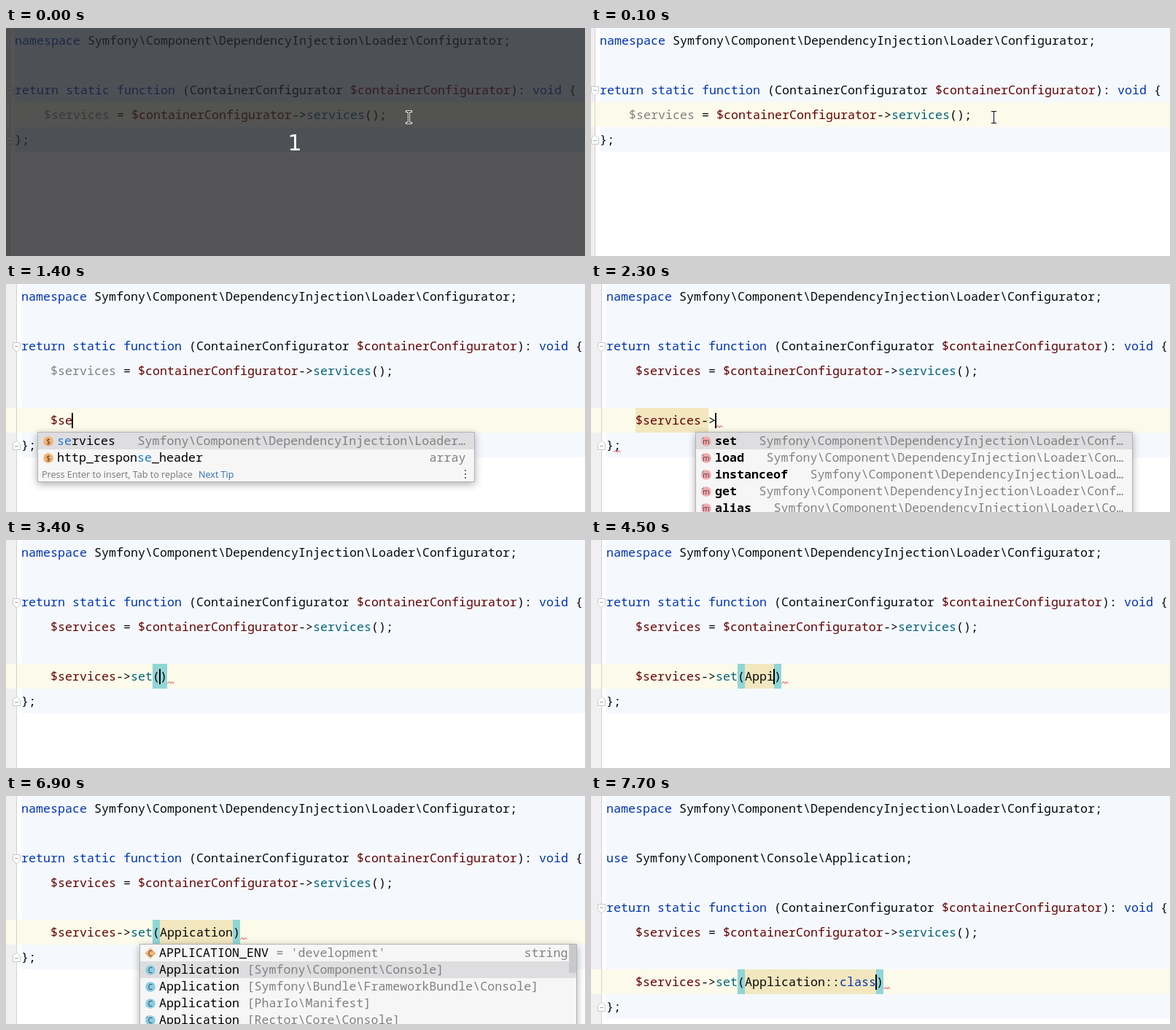
Write an HTML page with a canvas that moves like this. It is 794 px wide and 313 px high and loops after 8000 ms.

```html
<!DOCTYPE html>
<html lang="en">
<head>
<meta charset="utf-8">
<title>Code completion</title>
<style>
html, body { margin: 0; width: 100%; height: 100%; overflow: hidden; background: #fff; }
canvas { display: block; }
</style>
</head>
<body>
<canvas id="stage" width="794" height="313"></canvas>
<script>
const W = 794, H = 313, LOOP = 8000;
const ROW = 34, COL = 10, ITEM = 23;
const SIZE = 16.6667;
const MONO = '"Noto Sans Mono", "DejaVu Sans Mono", monospace';
const SANS = '"Open Sans", "Noto Sans", sans-serif';
const ctx = document.getElementById('stage').getContext('2d');

const INK = '#080808', GRAY = '#808080', KEY = '#0033b3', VAR = '#660000', CALL = '#00627a';
const KEYWORDS = /^(namespace|use|return|static|function|void|class)$/;
const LOADER = '   Symfony\\Component\\DependencyInjection\\Loader\\Configurator';

const VARS = [
  { icon: '$', name: 'services', detail: LOADER },
  { icon: '$', name: 'http_response_header', type: 'array' },
  { icon: '$', name: 'php_errormsg', type: 'string' }
];
const METHODS = ['set', 'load', 'instanceof', 'get', 'alias']
  .map(name => ({ icon: 'm', name, detail: LOADER, bold: true, mark: true }));
const CLASSES = [
  { icon: 'C', name: 'APPLICATION_ENV', detail: " = 'development'", type: 'string', diamond: true },
  ...['Symfony\\Component\\Console', 'Symfony\\Bundle\\FrameworkBundle\\Console',
    'PharIo\\Manifest', 'Rector\\Core\\Console']
    .map((ns, i) => ({ icon: 'C', name: 'Application', detail: ` [${ns}]`, mark: i === 3 }))
];
const CONSTS = [{ icon: 'C', name: 'class', diamond: true }];

const call = arg => ({ code: `$services->set(${arg})` });

// Each step overrides part of the state from its time on.
const steps = [
  [0, { pad: 12, blanks: -1, code: '', caret: false, mouse: true, dim: true }],
  [100, { dim: false }],
  [300, { caret: true }],
  [600, { caret: false }],
  [800, { blanks: 0, caret: true, mouse: false }],
  [1000, { pad: 21, blanks: 1 }],
  [1300, { code: '$s', popup: { col: 5, items: VARS, match: 's' } }],
  [1400, { code: '$se', popup: { col: 5, items: VARS.slice(0, 2), match: 'se' } }],
  [1800, { code: '$services', popup: null }],
  [2000, { code: '$services-' }],
  [2200, { code: '$services->', used: true, mark: true, error: true }],
  [2300, { popup: { col: 15, items: METHODS } }],
  [3100, { ...call(''), popup: null }],
  [3400, { mark: false }],
  [3900, call('A')],
  [4100, call('Ap')],
  [4200, call('App')],
  [4500, call('Appi')],
  [4600, call('Appica')],
  [4800, call('Appicat')],
  [4900, call('Appicati')],
  [5000, call('Appication')],
  [5600, { caret: false }],
  [5800, { popup: { col: 19, items: CLASSES } }],
  [5900, { popup: { col: 19, items: CLASSES, bar: true } }],
  [6500, { caret: true }],
  [6700, { caret: false }],
  [6900, { popup: { col: 19, items: CLASSES, bar: true, pick: 1 } }],
  [7100, { ...call('Application'), imported: true, popup: null, caret: true }],
  [7200, { ...call('Application::'), popup: { col: 32, items: CONSTS } }],
  [7700, { ...call('Application::class'), popup: null }]
];

function stateAt(t) {
  const s = {};
  for (const [at, change] of steps) if (at <= t) Object.assign(s, change);
  return s;
}

function rect(x, y, w, h, color) {
  ctx.fillStyle = color;
  ctx.fillRect(x, y, w, h);
}

function text(str, x, y, color, font = `${SIZE}px ${MONO}`, align = 'left') {
  ctx.font = font;
  ctx.textAlign = align;
  ctx.fillStyle = color;
  ctx.fillText(str, x, y);
}

function path(points, closed) {
  ctx.beginPath();
  points.forEach(([x, y]) => ctx.lineTo(x, y));
  if (closed) ctx.closePath();
}

function codeLine(str, x, row, unused) {
  let before = '';
  for (const m of str.matchAll(/\$\w+|\w+|[^\w$\s]+/g)) {
    const word = m[0];
    let color = INK;
    if (word[0] === '$') color = unused && m.index === 4 ? GRAY : VAR;
    else if (KEYWORDS.test(word)) color = KEY;
    else if (before === '->') color = CALL;
    text(word, x + m.index * COL, row * ROW + 23, color);
    before = word;
  }
}

function squiggle(x, row) {
  const y = row * ROW + 27;
  path([0, 1, 2, 3, 4].map(i => [x + 0.5 + i * 2.2, y - (i % 2 ? 2.5 : 0)]));
  ctx.strokeStyle = '#e0433f';
  ctx.lineWidth = 1;
  ctx.stroke();
}

function fold(cx, row, dir) {
  const cy = row * ROW + (dir > 0 ? 18.5 : 17.5);
  path([[-5, -6], [5, -6], [5, 2], [0, 6.5], [-5, 2]]
    .map(([x, y]) => [cx + x, cy + y * dir]), true);
  ctx.fillStyle = '#fff';
  ctx.fill();
  ctx.strokeStyle = '#c6c6c6';
  ctx.lineWidth = 1;
  ctx.stroke();
  rect(cx - 2.5, Math.floor(cy - dir), 5, 1, '#a8a8a8');
}

const ICON_COLORS = { $: '#f2b271', m: '#f5a9ac', C: '#87cde6' };

function icon(item, x, y) {
  ctx.fillStyle = item.diamond ? '#f0b476' : ICON_COLORS[item.icon];
  if (item.diamond) {
    path([[x, y - 7.5], [x + 7.5, y], [x, y + 7.5], [x - 7.5, y]], true);
  } else {
    ctx.beginPath();
    ctx.arc(x, y, 6.8, 0, 7);
  }
  ctx.fill();
  if (item.mark) {
    path([[x - 7, y - 3], [x - 3, y - 7], [x - 4, y - 3]], true);
    ctx.fillStyle = '#8b97a0';
    ctx.fill();
  }
  text(item.icon, x, y + 3.5, '#3f3a3a', `10px ${SANS}`, 'center');
}

function popup({ col, items, match, bar, pick = 0 }, pad, row) {
  const x = pad + col * COL - 28, y = (row + 1) * ROW - 1;
  const w = 600, h = items.length * ITEM + 23;
  ctx.save();
  ctx.shadowColor = 'rgba(0,0,0,.32)';
  ctx.shadowBlur = 10;
  ctx.shadowOffsetY = 3;
  rect(x, y, w, h, '#b4b4b4');
  ctx.restore();
  rect(x + 1, y + 1, w - 2, h - 2, '#f6f6f6');

  items.forEach((item, i) => {
    const top = y + 1 + i * ITEM, base = top + 17, left = x + 27;
    const font = `${item.bold ? 'bold ' : ''}${SIZE}px ${MONO}`;
    const { name, detail = '', type = '' } = item;
    if (i === pick) rect(x + 1, top, w - 2, ITEM, '#dedddf');
    icon(item, x + 15, top + 12);
    const at = match ? name.indexOf(match) : -1;
    if (at < 0) {
      text(name, left, base, '#000', font);
    } else {
      const end = at + match.length;
      text(name.slice(0, at), left, base, '#000', font);
      text(match, left + at * COL, base, '#1d79cf', font);
      text(name.slice(end), left + end * COL, base, '#000', font);
    }
    const room = 56 - name.length;
    const shown = detail.length > room ? detail.slice(0, room - 1) + '…' : detail;
    text(shown, left + name.length * COL + 0.5, base, GRAY);
    text(type, left + (56 - type.length) * COL + 0.5, base, GRAY);
  });

  const foot = y + 1 + items.length * ITEM;
  text('Press Enter to insert, Tab to replace', x + 6, foot + 16, '#777', `12.6px ${SANS}`);
  text('Next Tip', x + 221, foot + 16, '#2a6db5', `12.6px ${SANS}`);
  for (let i = 0; i < 3; i++) rect(x + 586, foot + 5 + i * 5, 2, 2, '#6a6a6a');
  if (bar) rect(x + w - 11, y + 1, 10, 39, '#c9c8ca');
}

function caret(x, row) {
  rect(x - 1, row * ROW + 7, 2, 21, '#000');
}

function mouse(x, y) {
  for (const [width, color] of [[3, '#f4f4f4'], [1, '#111']]) {
    ctx.beginPath();
    for (const d of [-1, 1]) {
      ctx.moveTo(x - 3, y + d * 8);
      ctx.lineTo(x + 3, y + d * 8);
    }
    ctx.moveTo(x, y - 8);
    ctx.lineTo(x, y + 8);
    ctx.lineWidth = width;
    ctx.strokeStyle = color;
    ctx.lineCap = 'square';
    ctx.stroke();
  }
  ctx.lineCap = 'butt';
}

function draw(t) {
  const s = stateAt(t), { pad, code } = s;
  const head = s.imported ? 4 : 2;
  const row = head + 2 + s.blanks;
  const end = row + 1;
  const edge = pad - 7;
  const colX = n => pad + n * COL;

  rect(0, 0, W, H, '#fff');
  rect(0, 0, edge, H, '#f1eff1');
  rect(pad, 0, W, (end + 1) * ROW, s.dim ? '#e2f0ff' : '#f5f9fe');
  rect(0, row * ROW, W, ROW, '#fcfaea');
  rect(edge, 0, 1, H, '#d3d1d3');

  const open = code.indexOf('(');
  const stop = code.endsWith(')') ? code.length - 1 : code.length;
  const band = (from, n, color) => rect(colX(4 + from), row * ROW, n * COL, ROW, color);
  if (s.mark) band(0, 10, '#f2e7bf');
  if (open > 0) {
    band(open + 1, stop - open - 1, '#f2e7bf');
    band(open, 1, '#90d6d7');
    band(stop, 1, '#90d6d7');
  }

  const line = (str, r, unused) => codeLine(str, pad, r, unused);
  line('namespace Symfony\\Component\\DependencyInjection\\Loader\\Configurator;', 0);
  if (s.imported) line('use Symfony\\Component\\Console\\Application;', 2);
  line('return static function (ContainerConfigurator $containerConfigurator): void {', head);
  line('    $services = $containerConfigurator->services();', head + 1, !s.used);
  if (code) line('    ' + code, row);
  line('};', end);

  fold(edge + 0.5, head, 1);
  fold(edge + 0.5, end, -1);
  if (s.error) squiggle(colX(4 + code.length), row);
  if (s.mark) squiggle(colX(1), end);
  if (s.caret) caret(colX(s.blanks < 0 ? 51 : 4 + stop), row);
  if (s.popup) popup(s.popup, pad, row);

  if (s.dim) {
    rect(0, 0, W, H, 'rgba(36,36,39,.78)');
    text('1', 396, 168, '#fff', '30px "DejaVu Sans", sans-serif', 'center');
  }
  if (s.mouse) mouse(552.5, 122.5);
}

const start = performance.now();
function tick() {
  draw((performance.now() - start) % LOOP);
  requestAnimationFrame(tick);
}
tick();
</script>
</body>
</html>
```
